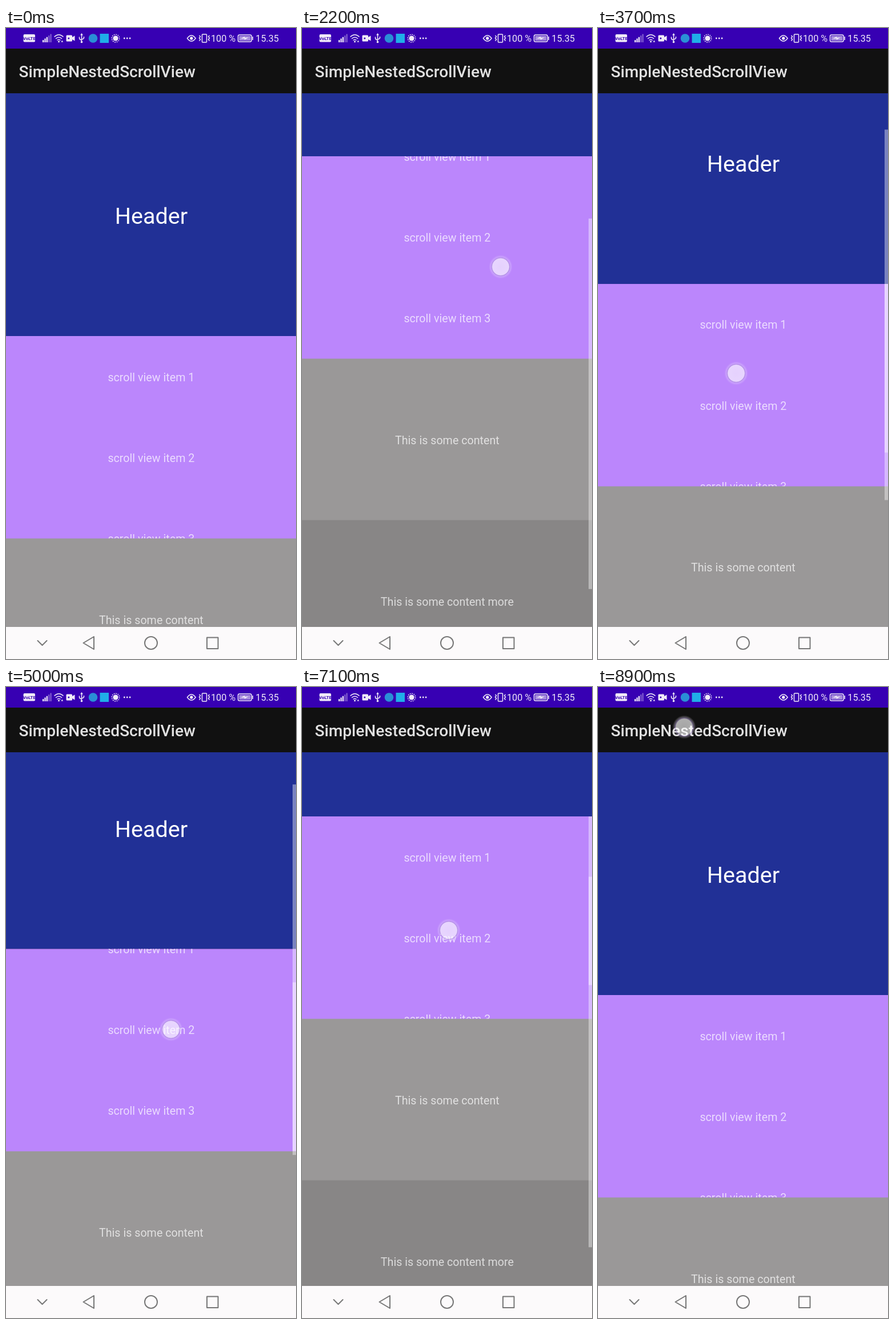
Animation of 508x1102 px, one loop 9 s. Source, as an HTML page:

```html
<!DOCTYPE html>
<html lang="en">
<head>
<meta charset="utf-8">
<title>SimpleNestedScrollView</title>
<style>
  html, body { margin: 0; width: 100%; height: 100%; overflow: hidden; background: #111; }
  svg { display: block; width: 508px; height: 1102px; font-family: Roboto, sans-serif; }
  .label { font-size: 19.7px; fill: #fff; fill-opacity: .7; text-anchor: middle; }
  .head { font-size: 39.6px; fill: #fff; text-anchor: middle; }
  .title { font-size: 28.1px; font-weight: 500; fill: #e1e1e1; }
  .status { font-size: 16.2px; }
  .line { fill: none; stroke: #f0eaf8; stroke-width: 1.5; }
  .nav { fill: none; stroke: #777; stroke-width: 2; stroke-linejoin: round; stroke-linecap: round; }
  .bar { fill: #fff; fill-opacity: .4; }
</style>
</head>
<body>
<svg viewBox="0 0 508 1102">
  <defs>
    <clipPath id="view"><rect y="114" width="508" height="932"/></clipPath>
    <clipPath id="listClip"><rect width="508" height="353.5"/></clipPath>
    <radialGradient id="glow">
      <stop offset="0" stop-color="#fff" stop-opacity=".62"/>
      <stop offset=".7" stop-color="#fff" stop-opacity=".66"/>
      <stop offset=".77" stop-color="#a58cd0" stop-opacity=".55"/>
      <stop offset=".83" stop-color="#e8d8ff" stop-opacity=".3"/>
      <stop offset="1" stop-color="#fff" stop-opacity="0"/>
    </radialGradient>
  </defs>

  <g clip-path="url(#view)">
    <g id="page">
      <rect width="508" height="424" fill="#213096"/>
      <text class="head" x="254.5" y="228.3">Header</text>
      <g transform="translate(0 424)">
        <rect width="508" height="360" fill="#bb86fc"/>
        <g clip-path="url(#listClip)">
          <g id="list"></g>
          <rect id="listBar" class="bar" x="502" width="6" height="294.5"/>
        </g>
      </g>
      <rect y="777.5" width="508" height="290" fill="#9a9898"/>
      <text class="label" x="254.4" y="926.5">This is some content</text>
      <rect y="1059.5" width="508" height="290" fill="#888686"/>
      <text class="label" x="254.4" y="1209">This is some content more</text>
    </g>
    <rect id="pageBar" class="bar" x="502" width="6" height="647"/>
  </g>

  <rect y="36" width="508" height="78" fill="#111"/>
  <text class="title" x="22.6" y="85.7">SimpleNestedScrollView</text>

  <rect width="508" height="36" fill="#3700b3"/>
  <g id="icons" fill="#f0eaf8">
    <rect x="30.5" y="11" width="20.5" height="13.5" rx="2"/>
    <text x="40.8" y="20.8" font-size="7.8" font-weight="700" fill="#3700b3" text-anchor="middle">VoLTE</text>
    <path class="line" d="M84.5 15.5q8-7.5 16 0M87 18.7q5.5-5 11 0M89.5 21.5q3-2.6 6 0"/>
    <circle cx="92.5" cy="23.8" r="1.5"/>
    <path d="M96.5 24.5l1.8-3 1.8 3z"/>
    <path d="M107 12.5h7.5q1.5 0 1.5 1.5v2l4.5-2.5v9L116 20v2q0 1.5-1.5 1.5H107q-1.5 0-1.5-1.5v-8q0-1.5 1.5-1.5z"/>
    <circle cx="109.8" cy="18" r="1.5" fill="#3700b3"/>
    <path class="line" d="M132.5 12v12M128.5 15.5v2.5q0 2 4 3.3M136.5 15v2q0 2-4 3"/>
    <path d="M132.5 9l2.4 3.5h-4.8z"/>
    <circle cx="132.5" cy="24.5" r="1.8"/>
    <circle cx="152.5" cy="18" r="7.8" fill="#2a8fd6"/>
    <rect x="164.5" y="10" width="15.5" height="16" fill="#20aee8"/>
    <circle cx="192" cy="18" r="4.6"/>
    <circle class="line" cx="192" cy="18" r="6.7" stroke-dasharray="1.8 1.708"/>
    <path class="line" d="M317.5 18q7.3-10 14.6 0q-7.3 10-14.6 0z"/>
    <circle cx="324.8" cy="18" r="2.7"/>
    <rect class="line" x="343.5" y="11" width="8" height="14" rx="1"/>
    <path class="line" d="M338.5 13l2 2-2 2.5 2 2.5-2 2.5M356.5 13l-2 2 2 2.5-2 2.5 2 2.5"/>
    <text class="status" x="359" y="23.8">100 %</text>
    <rect class="line" x="406.5" y="12" width="23.5" height="12" rx="2.5"/>
    <rect x="408.3" y="13.8" width="20" height="8.4" rx="1" opacity=".6"/>
    <path d="M411 18.5l7-3.5.5 2 6.5-.5-7 4-.5-2z"/>
    <rect x="431.3" y="15" width="1.6" height="6"/>
    <text class="status" x="437.3" y="23.8">15.35</text>
  </g>

  <rect y="1046" width="508" height="56" fill="#fcfafb"/>
  <path class="nav" d="M55.5 1070l8 8 8-8M135.5 1074l18.5-11v22zM352 1064.5h19.5v19.5H352z"/>
  <circle class="nav" cx="254" cy="1074" r="11"/>

  <circle id="dot" r="20.5" fill="url(#glow)"/>
</svg>
<script>
const LOOP = 9000, STEP = 100, TOP = 114;
const PAGE_MAX = 409, LIST_MAX = 71, SLOP = 11;
const BAR_DELAY = 300, BAR_FADE = 250;

const el = id => document.getElementById(id);
const page = el("page"), list = el("list"), dot = el("dot");
const pageBar = el("pageBar"), listBar = el("listBar");

function add(parent, tag, attrs, text = "") {
  const node = document.createElementNS("http://www.w3.org/2000/svg", tag);
  for (const key in attrs) node.setAttribute(key, attrs[key]);
  node.textContent = text;
  parent.append(node);
}

for (let i = 0; i < 3; i++) {
  add(list, "text", { class: "label", x: 254.4, y: 78.5 + i * 141.2 }, `scroll view item ${i + 1}`);
  add(el("icons"), "circle", { cx: 207.3 + i * 4.9, cy: 18, r: 1.4 });
}
for (let i = 0; i < 5; i++) {
  const h = 4 + i * 2.6;
  add(el("icons"), "rect", { x: 64 + i * 3.35, y: 25 - h, width: 2.3, height: h, opacity: i < 3 ? 1 : .4 });
}

// power shapes the finger's speed; glide is the decay time of the fling
const swipe = (start, end, from, to, power, glide) => ({ start, end, from, to, power, glide });
const swipes = [
  swipe(1000, 2300, [318, 813], [350.5, 384], 1, 300),
  swipe(2800, 3800, [272, 203], [238.7, 647.4], 1, 90),
  swipe(4500, 5300, [268, 754], [312.5, 423], 1.6, 240),
  swipe(6500, 7450, [245, 246], [270, 619.4], 1.6, 250),
  swipe(8800, 9000, [151, 70], [151, 70], 1, 0)
];

const clamp = (v, max) => Math.min(max, Math.max(0, v));

function finger(s, t) {
  const k = clamp((t - s.start) / (s.end - s.start), 1) ** s.power;
  return s.from.map((v, i) => v + (s.to[i] - v) * k);
}

// Signed scroll distance of one swipe, fling included
function travel(s, t) {
  const up = s.from[1] - finger(s, t)[1];
  const drag = Math.sign(up) * Math.max(0, Math.abs(up) - SLOP);
  if (t <= s.end) return drag;
  const speed = s.power * (s.from[1] - s.to[1]) / (s.end - s.start);
  return drag + speed * s.glide * (1 - Math.exp((s.end - t) / s.glide));
}

// The list takes each swipe first, the page takes what is left
function scrollAt(t) {
  let outer = 0, inner = 0;
  for (const s of swipes) {
    if (t <= s.start) break;
    const d = travel(s, t), next = clamp(inner + d, LIST_MAX);
    outer = clamp(outer + d - (next - inner), PAGE_MAX);
    inner = next;
  }
  return { outer, inner };
}

// A bar stays while its view moves, then waits and fades
function barOpacity(t, moved) {
  const span = 25;
  for (let idle = 0; idle < BAR_DELAY + BAR_FADE; idle += span) {
    if (moved(scrollAt(t - idle - span), scrollAt(t - idle)))
      return 1 - clamp((idle - BAR_DELAY) / BAR_FADE, 1);
  }
  return 0;
}

const pageMoved = (a, b) => Math.abs(b.outer - a.outer) > .2;
const listMoved = (a, b) => a.inner !== b.inner || a.outer - b.outer > .2;
const shift = (node, x, y) => node.setAttribute("transform", `translate(${x} ${y})`);

function draw(t) {
  const { outer, inner } = scrollAt(t);
  shift(page, 0, TOP - outer);
  shift(list, 0, -inner);
  shift(pageBar, 0, TOP + outer * 285 / PAGE_MAX);
  shift(listBar, 0, inner * 58.5 / LIST_MAX);
  pageBar.style.opacity = barOpacity(t, pageMoved);
  listBar.style.opacity = barOpacity(t, listMoved);

  const touch = swipes.find(s => t >= s.start && t <= s.end);
  dot.style.display = touch ? "" : "none";
  if (touch) shift(dot, ...finger(touch, t));
}

const start = performance.now();
function tick() {
  const t = (performance.now() - start) % LOOP;
  draw(Math.floor(t / STEP) * STEP);
  requestAnimationFrame(tick);
}
tick();
</script>
</body>
</html>
```
